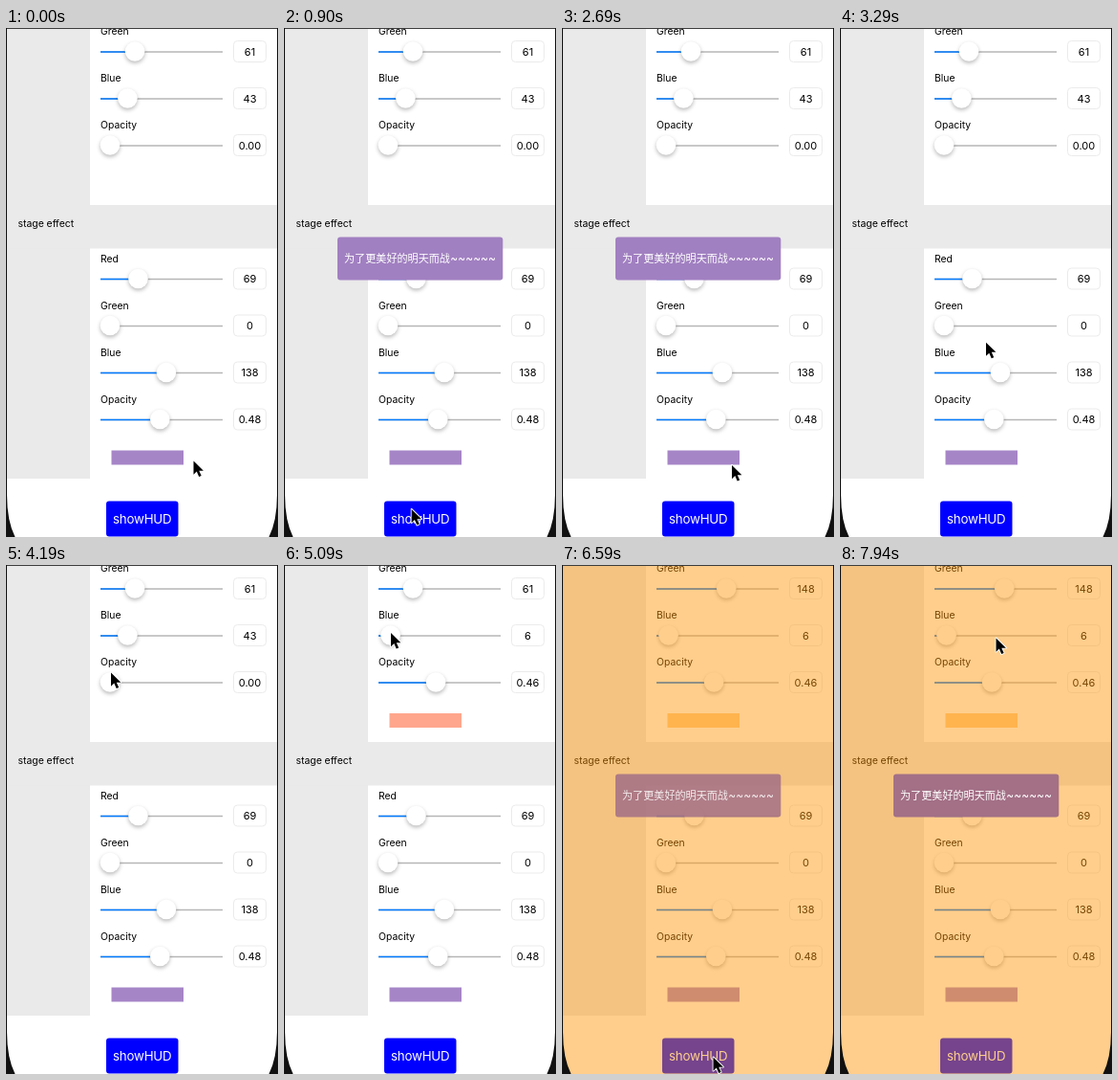
Recreate the animation shown at these times as an HTML page with a canvas. Size 285 px wide and 532 px high, loop 8 s.

```html
<!DOCTYPE html>
<html lang="zh">
<head>
<meta charset="utf-8">
<style>
html, body { margin: 0; width: 100%; height: 100%; overflow: hidden; background: #fff; }
canvas { display: block; }
</style>
</head>
<body>
<canvas id="stage" width="285" height="532"></canvas>
<script>
const ctx = document.getElementById('stage').getContext('2d');
const LOOP = 8000, TICK = 150;
const UI = 'Inter, sans-serif';
const CJK = '"Noto Sans CJK SC", "Noto Sans CJK", sans-serif';

// Keys are [tick, value, ...]
const pointerKeys = [
  [0, 196.5, 452.5], [3, 134, 503], [7, 133.5, 503], [13, 185, 450], [15, 184, 451],
  [17, 178, 457], [20, 178, 457], [26, 103, 72], [28, 110, 112.5], [31, 160, 114],
  [32, 128, 70], [34, 112, 71], [36, 135, 22], [38, 172, 22], [39, 165, 434],
  [42, 158.5, 514.5], [44, 158.5, 514.5], [50, 165, 253], [53, 163.5, 76.5]
];
const opacityKeys = [[28, 0], [31, 0.46]];
const blueKeys = [[32, 43], [34, 6]];
const greenKeys = [[36, 61], [38, 148]];

function track(keys, tick) {
  if (tick <= keys[0][0]) return keys[0].slice(1);
  const i = keys.findIndex(key => key[0] >= tick);
  if (i < 0) return keys[keys.length - 1].slice(1);
  const a = keys[i - 1], b = keys[i];
  const p = (tick - a[0]) / (b[0] - a[0]);
  return a.slice(1).map((v, k) => v + (b[k + 1] - v) * p);
}

function rect(x, y, w, h, color) {
  ctx.fillStyle = color;
  ctx.fillRect(x, y, w, h);
}

function rounded(x, y, w, h, r) {
  ctx.beginPath();
  ctx.roundRect(x, y, w, h, r);
}

function text(str, x, y, size, color = '#000', align = 'left', family = UI) {
  ctx.font = `${size}px ${family}`;
  ctx.textAlign = align;
  ctx.fillStyle = color;
  ctx.fillText(str, x, y);
}

function slider(label, value, y, max = 255) {
  const x = 109 + value / max * 109;
  text(label, 99, y - 18, 10.4);
  rect(99, y - 0.75, 128, 1.5, '#b6b6b6');
  rect(99, y - 0.75, x - 99, 1.5, '#007aff');

  ctx.save();
  ctx.shadowColor = 'rgba(0,0,0,.28)';
  ctx.shadowBlur = 4;
  ctx.shadowOffsetY = 2;
  ctx.fillStyle = '#fff';
  ctx.beginPath();
  ctx.arc(x, y - 0.5, 10.3, 0, Math.PI * 2);
  ctx.fill();
  ctx.restore();

  rounded(238.5, y - 11.5, 34, 22, 4);
  ctx.strokeStyle = '#ebebeb';
  ctx.lineWidth = 1;
  ctx.stroke();
  text(max === 1 ? value.toFixed(2) : Math.round(value), 255.5, y + 3.5, 11, '#000', 'center');
}

function page(green, blue, opacity, mask) {
  rect(0, 0, 285, 532, '#fff');
  rect(0, 0, 88, 471, '#eaeaea');
  rect(0, 185, 285, 45.5, '#eaeaea');
  text('stage effect', 12.5, 208, 10.4);

  slider('Green', green, 25);
  slider('Blue', blue, 74);
  slider('Opacity', opacity, 123, 1);
  rect(110.5, 155, 75.5, 15, mask);

  slider('Red', 69, 262.5);
  slider('Green', 0, 311.5);
  slider('Blue', 138, 360.5);
  slider('Opacity', 0.48, 409.5, 1);
  rect(110.5, 441.5, 75.5, 15, 'rgba(69,0,138,.48)');

  rounded(105, 494.5, 75.5, 37, 3);
  ctx.fillStyle = '#00f';
  ctx.fill();
  ctx.letterSpacing = '-0.2px';
  text('showHUD', 142.7, 518, 13.3, '#fff', 'center');
  ctx.letterSpacing = '0px';
}

function hud(mask, color, alpha) {
  rect(0, 0, 285, 532, mask);
  ctx.globalAlpha = alpha;
  rounded(56, 218.5, 173.3, 45, 3);
  ctx.fillStyle = color;
  ctx.fill();
  text('为了更美好的明天而战', 63, 245, 11.1, '#fff', 'left', CJK);
  text('~~~~~~', 222, 245, 12, '#fff', 'right');
  ctx.globalAlpha = 1;
}

function bezel() {
  rect(0, 0, 285, 1, '#3c3c3c');
  ctx.fillStyle = '#111';
  for (const side of [1, -1]) {
    ctx.save();
    if (side < 0) {
      ctx.translate(285, 0);
      ctx.scale(-1, 1);
    }
    ctx.fill(new Path2D('M0 0H1V488Q1 515 9.5 532H0Z'));
    ctx.restore();
  }
}

const arrow = new Path2D('M0 0V14.2L3.3 11.1L5.7 16.6L8.2 15.5L5.8 10.2H10.4Z');

function pointer(x, y) {
  ctx.save();
  ctx.translate(x, y);
  ctx.strokeStyle = '#fff';
  ctx.lineWidth = 1.8;
  ctx.lineJoin = 'round';
  ctx.stroke(arrow);
  ctx.fillStyle = '#000';
  ctx.fill(arrow);
  ctx.restore();
}

function draw(now) {
  const t = now % LOOP;
  const tick = Math.min(53, Math.floor((t < 2200 ? t : t + 10) / TICK));
  const [green] = track(greenKeys, tick);
  const [blue] = track(blueKeys, tick);
  const [opacity] = track(opacityKeys, tick);
  const mask = `rgba(255,${Math.round(green)},${Math.round(blue)},${opacity})`;

  page(green, blue, opacity, mask);
  if (tick >= 5 && tick < 19) hud(mask, '#a180c1', tick === 5 ? 0.86 : 1);
  if (tick >= 44) hud(mask, '#a37086', tick === 44 ? 0.86 : 1);
  bezel();
  if (tick < 40 || tick > 41) pointer(...track(pointerKeys, tick));
  requestAnimationFrame(() => draw(performance.now()));
}

draw(0);
</script>
</body>
</html>
```
